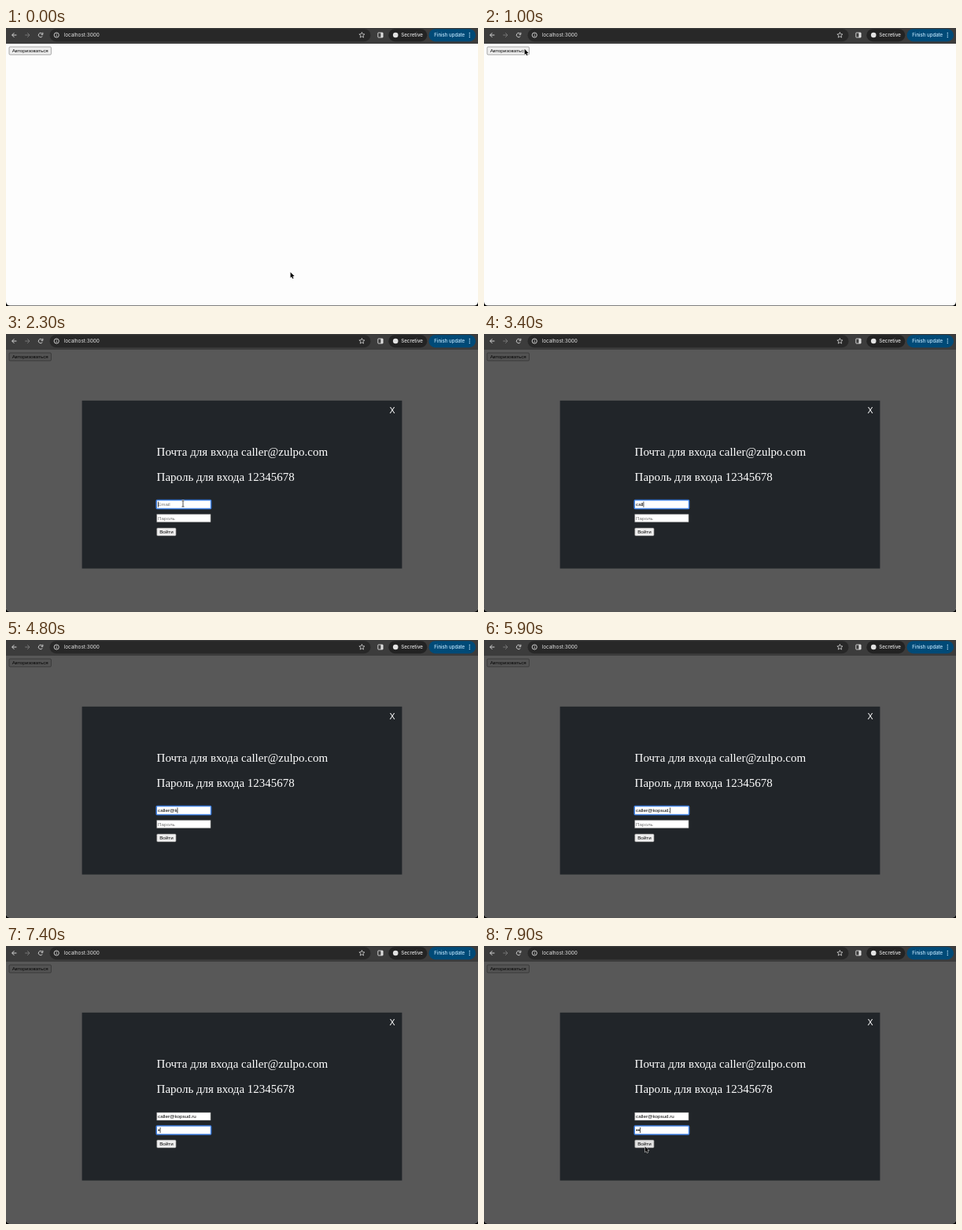
An HTML page with a canvas that plays this animation: 600x354 px, repeating every 8 s.

```html
<!DOCTYPE html>
<html lang="ru">
<head>
<meta charset="utf-8">
<title>Вход</title>
<style>
  html, body { margin: 0; width: 100%; height: 100%; overflow: hidden; background: #000; }
  canvas { display: block; width: 600px; height: 354px; }
</style>
</head>
<body>
<canvas id="stage"></canvas>
<script>
const W = 600, H = 354, LOOP = 8000, STEP = 100;
const SANS = '"Liberation Sans", Arial, sans-serif';
const SERIF = '"Liberation Serif", "Times New Roman", serif';
const UI = 'Inter, Roboto, sans-serif';

const canvas = document.getElementById('stage');
const ctx = canvas.getContext('2d');
const ratio = window.devicePixelRatio || 1;
canvas.width = W * ratio;
canvas.height = H * ratio;
ctx.scale(ratio, ratio);

const EMAIL = 'caller@kopsud.ru';
const OPEN = 1100, FOCUS_EMAIL = 2300, FOCUS_PASS = 6900;
const emailKeys = [2700, 2900, 3200, 3400, 3600, 3900, 3900, 4800, 5000, 5200,
                   5500, 5600, 5800, 5900, 6100, 6300];
const passKeys = [7400, 7600];

// Pointer: time, x, y
const path = [
  [0, 361.6, 311], [100, 262, 196], [200, 158.5, 95.5], [300, 158.5, 95.5],
  [500, 112, 62], [700, 74, 39], [900, 54, 28], [1000, 51.6, 26.8],
  [1200, 51.6, 26.8], [1500, 110, 98], [1800, 192, 180], [2100, 225, 208],
  [2200, 225, 216], [6300, 225, 216], [6400, 205, 238], [6500, 170, 266.5],
  [6600, 193, 241], [6700, 204, 234], [6800, 207.6, 232.4],
  [7600, 207.6, 232.4], [7700, 206.5, 243], [7800, 205, 253], [7900, 204.6, 255.3]
];
const hidden = [[2600, 6400], [7400, 7700]];

const loginBtn = { x: 4, y: 24, w: 53.4, h: 10, label: 'Авторизоваться' };
const submitBtn = { x: 191.7, y: 247, w: 24.4, h: 10, label: 'Войти' };
const emailBox = { x: 191.7, y: 212.1, w: 68.4, h: 9.8 };
const passBox = { x: 191.7, y: 229.6, w: 68.4, h: 9.8 };

const inside = (p, r) => p.x >= r.x && p.x <= r.x + r.w && p.y >= r.y && p.y <= r.y + r.h;

function box(x, y, w, h, r, fill, stroke, line = 0.6) {
  ctx.beginPath();
  ctx.roundRect(x, y, w, h, r);
  if (fill) { ctx.fillStyle = fill; ctx.fill(); }
  if (stroke) { ctx.strokeStyle = stroke; ctx.lineWidth = line; ctx.stroke(); }
}

function text(str, x, y, font, color, align = 'left') {
  ctx.font = font;
  ctx.fillStyle = color;
  ctx.textAlign = align;
  ctx.fillText(str, x, y);
}

function line(points, color, width = 0.95) {
  ctx.beginPath();
  points.forEach(([x, y]) => ctx.lineTo(x, y));
  ctx.strokeStyle = color;
  ctx.lineWidth = width;
  ctx.stroke();
}

function disc(x, y, r, color) {
  ctx.beginPath();
  ctx.arc(x, y, r, 0, Math.PI * 2);
  ctx.fillStyle = color;
  ctx.fill();
}

function ring(x, y, r, from, to, color) {
  ctx.beginPath();
  ctx.arc(x, y, r, from, to);
  ctx.strokeStyle = color;
  ctx.lineWidth = 0.9;
  ctx.stroke();
}

function star(cx, cy, r) {
  ctx.beginPath();
  for (let i = 0; i < 10; i++) {
    const a = -Math.PI / 2 + i * Math.PI / 5, d = i % 2 ? r * 0.45 : r;
    ctx.lineTo(cx + d * Math.cos(a), cy + d * Math.sin(a));
  }
  ctx.closePath();
  ctx.strokeStyle = '#d5d5d5';
  ctx.lineWidth = 0.8;
  ctx.stroke();
}

function toolbar() {
  const light = '#dcdcdc', dim = '#7a7a7a';
  ctx.fillStyle = '#3c3c3c';
  ctx.fillRect(0, 0, W, 20);

  line([[13.4, 9], [7.8, 9]], light);
  line([[10.4, 6.2], [7.6, 9], [10.4, 11.8]], light);
  line([[24.2, 9], [29.8, 9]], dim);
  line([[27.2, 6.2], [30, 9], [27.2, 11.8]], dim);
  ring(44, 9, 2.7, 0.5, 5.5, light);
  line([[46.8, 5.8], [46.8, 8.3], [44.4, 8.3]], light);

  box(55.5, 1.2, 408, 16, 8, '#282828');
  ring(64.2, 9, 3.1, 0, Math.PI * 2, light);
  line([[64.2, 8.5], [64.2, 10.8]], light, 0.8);
  disc(64.2, 7.3, 0.5, light);
  text('localhost:3000', 73.6, 11.3, '6.4px ' + UI, '#e3e3e3');
  star(452.4, 9.1, 3.7);

  box(472.8, 6, 6.2, 6, 0.6, null, light, 0.9);
  ctx.fillStyle = light;
  ctx.fillRect(476.4, 6, 2.8, 6);

  box(486.3, 1.2, 49, 16, 8, '#232323');
  disc(495.2, 9, 3.3, '#e3e3e3');
  text('Secretive', 502.3, 11.2, '500 6.15px ' + UI, '#e3e3e3');

  box(537.5, 1.2, 59.5, 16, 8, '#004a77');
  text('Finish update', 544.3, 11.2, '500 6.05px ' + UI, '#c2e7ff');
  for (const y of [6.4, 9, 11.6]) disc(589.3, y, 0.75, '#c2e7ff');
}

function button(b, hover) {
  box(b.x, b.y, b.w, b.h, 1.2, hover ? '#e2e2e2' : '#efefef', '#707070');
  text(b.label, b.x + b.w / 2, b.y + 7.2, '6.25px ' + SANS, '#000', 'center');
}

function field(f, value, hint, focused, caretOn) {
  if (focused) box(f.x - 0.5, f.y - 0.5, f.w + 1, f.h + 1, 1, '#fff', '#3f7fe0', 1.5);
  else box(f.x, f.y, f.w, f.h, 0, '#fff', '#858585', 0.5);
  const x = f.x + 1.4, base = f.y + 7.1;
  let end = x;
  if (hint === 'Пароль' && value) {
    for (let i = 0; i < value; i++) disc(x + 1.3 + i * 2.5, f.y + 4.9, 1, '#000');
    end += value * 2.5;
  } else {
    text(value || hint, x, base, '6.25px ' + SANS, value ? '#000' : '#757575');
    if (value) end += ctx.measureText(value).width;
  }
  if (focused && caretOn) {
    ctx.fillStyle = '#000';
    ctx.fillRect(end + 0.1, f.y + 1.4, 0.7, 7);
  }
}

function caretVisible(t) {
  const last = [FOCUS_EMAIL, FOCUS_PASS, ...emailKeys, ...passKeys]
    .filter(k => k <= t).reduce((a, b) => Math.max(a, b), 0);
  return (t - last) % 1000 < 500;
}

function modal(t, p) {
  ctx.fillStyle = 'rgba(0,0,0,0.65)';
  ctx.fillRect(0, 20, W, H - 20);
  ctx.fillStyle = '#212529';
  ctx.fillRect(96.6, 84.8, 406.8, 213.8);
  text('X', 491.1, 100.9, '10.6px ' + SANS, '#fff', 'center');
  text('Почта для входа caller@zulpo.com', 191.6, 154.5, '15px ' + SERIF, '#fff');
  text('Пароль для входа 12345678', 191.6, 187, '15px ' + SERIF, '#fff');

  const typed = keys => keys.filter(k => k <= t).length;
  const caret = caretVisible(t);
  field(emailBox, EMAIL.slice(0, typed(emailKeys)), 'Email', t >= FOCUS_EMAIL && t < FOCUS_PASS, caret);
  field(passBox, typed(passKeys), 'Пароль', t >= FOCUS_PASS, caret);
  button(submitBtn, inside(p, submitBtn));
}

function pointerAt(t) {
  let i = 0;
  while (i < path.length - 2 && path[i + 1][0] <= t) i++;
  const [t0, x0, y0] = path[i], [t1, x1, y1] = path[i + 1];
  const k = Math.min(1, (t - t0) / (t1 - t0));
  return { x: x0 + (x1 - x0) * k, y: y0 + (y1 - y0) * k };
}

function arrow({ x, y }) {
  const shape = [[0, 0], [0, 7.1], [1.6, 5.7], [2.7, 8.2], [3.9, 7.7], [2.8, 5.2], [5, 5.1]];
  ctx.beginPath();
  shape.forEach(([dx, dy]) => ctx.lineTo(x + dx, y + dy));
  ctx.closePath();
  ctx.lineJoin = 'round';
  ctx.strokeStyle = '#fff';
  ctx.lineWidth = 1;
  ctx.stroke();
  ctx.fillStyle = '#000';
  ctx.fill();
  ctx.lineJoin = 'miter';
}

function beam({ x, y }) {
  for (const [color, w] of [['#fff', 1.8], ['#222', 0.8]]) {
    line([[x, y - 3.6], [x, y + 3.6]], color, w);
    line([[x - 1.5, y - 3.8], [x + 1.5, y - 3.8]], color, w);
    line([[x - 1.5, y + 3.8], [x + 1.5, y + 3.8]], color, w);
  }
}

function draw(t) {
  const p = pointerAt(t), open = t >= OPEN;
  ctx.fillStyle = '#000';
  ctx.fillRect(0, 0, W, H);
  ctx.save();
  ctx.beginPath();
  ctx.roundRect(0, -10, W, H + 9.6, 5);
  ctx.rect(0, 0, W, 20);
  ctx.clip();
  ctx.fillStyle = '#fdfdfd';
  ctx.fillRect(0, 20, W, H - 20);
  button(loginBtn, false);
  if (open) modal(t, p);
  ctx.restore();
  toolbar();

  if (hidden.some(([a, b]) => t >= a && t < b)) return;
  if (open && (inside(p, emailBox) || inside(p, passBox))) beam(p);
  else arrow(p);
}

const start = performance.now();
function tick() {
  const t = (performance.now() - start) % LOOP;
  draw(Math.floor(t / STEP) * STEP);
  requestAnimationFrame(tick);
}
tick();
</script>
</body>
</html>
```
